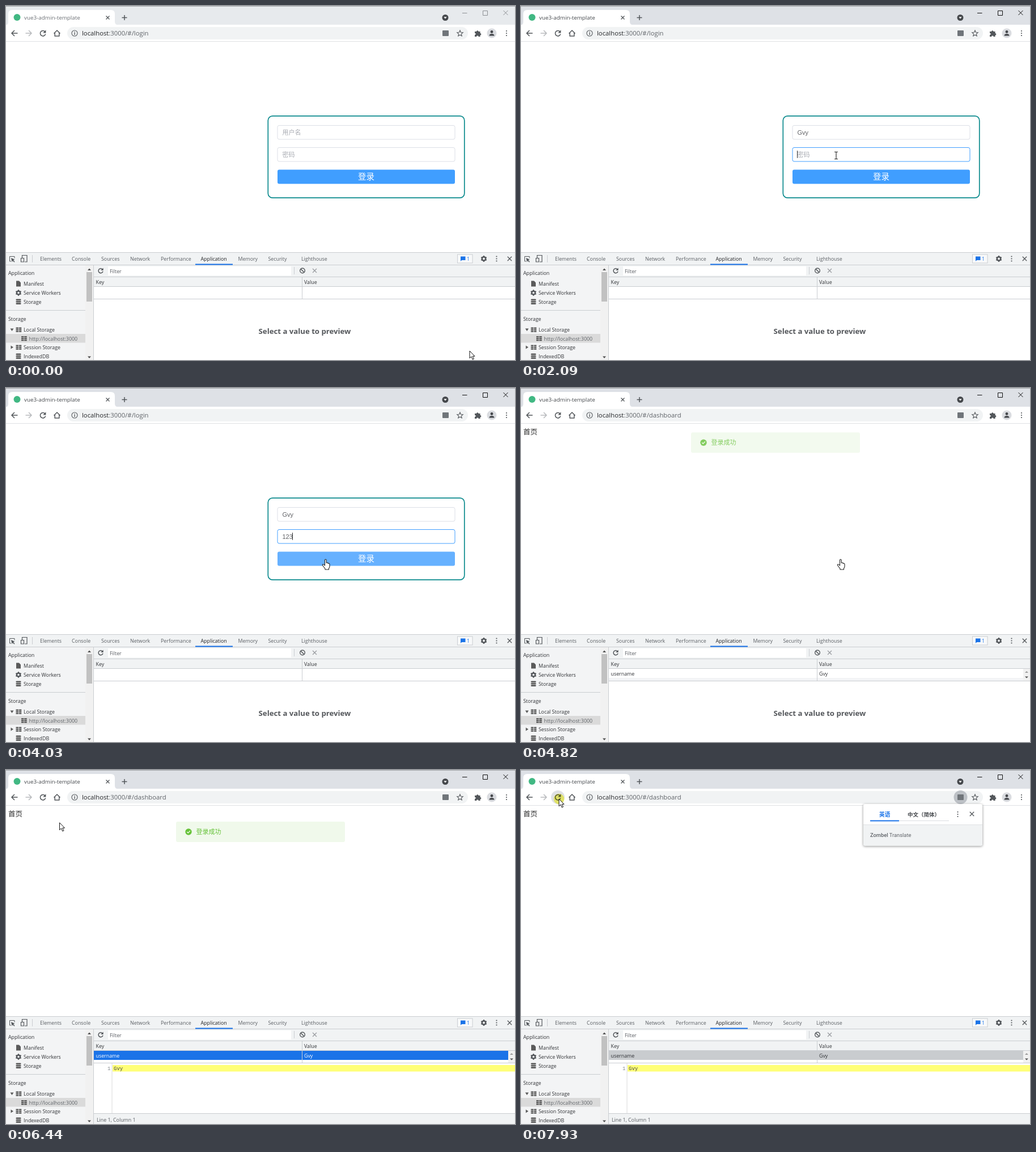
These frames come from a looping animation (898x624 px, 7.99 s). An HTML page:

```html
<!DOCTYPE html>
<html lang="zh-CN">
<head>
<meta charset="utf-8">
<title>Login demo</title>
<style>
html, body { margin: 0; width: 100%; height: 100%; overflow: hidden; background: #fff; }
svg { display: block; width: 898px; height: 624px; font-family: "Open Sans", "Noto Sans CJK SC", "Noto Sans CJK", sans-serif; }
text { white-space: pre; }
.input { font-family: "Liberation Sans", "Noto Sans CJK SC", "Noto Sans CJK", sans-serif; }
.code { font-family: "Liberation Mono", monospace; }
.brand { font-family: Roboto, sans-serif; }
.line { fill: none; stroke: #53575b; stroke-width: 1.5; }
</style>
</head>
<body>
<svg id="stage" viewBox="0 0 898 624"></svg>
<script>
const LOOP = 7990;
const USER = 'Gvy';
const DARK = '#53575b', INK = '#303236', BAR = '#f1f3f4', RULE = '#cacdd1', BLUE = '#1a73e8';

const rect = (x, y, w, h, fill, extra = '') =>
  `<rect x="${x}" y="${y}" width="${w}" height="${h}" fill="${fill}" ${extra}/>`;
const circle = (x, y, r, fill, extra = '') =>
  `<circle cx="${x}" cy="${y}" r="${r}" fill="${fill}" ${extra}/>`;
const path = (d, extra = 'class="line"') => `<path d="${d}" ${extra}/>`;
const solid = (d, fill = DARK) => path(d, `fill="${fill}"`);
const text = (x, y, s, size = 8.85, fill = INK, extra = '') =>
  `<text x="${x}" y="${y}" font-size="${size}" fill="${fill}" ${extra}>${s}</text>`;
const group = (id, body, extra = '') => `<g id="${id}" ${extra}>${body}</g>`;
const cross = (x, y, r, color = DARK, w = 1.3) =>
  path(`M${x - r} ${y - r}l${2 * r} ${2 * r}m0 ${-2 * r}l${-2 * r} ${2 * r}`,
    `fill="none" stroke="${color}" stroke-width="${w}"`);
const dots = (x, y) => [-4, 0, 4].map(d => circle(x, y + d, 1.1, DARK)).join('');
const reload = (x, y, r) =>
  path(`M${x + r * .8} ${y - r * .6}A${r} ${r} 0 1 0 ${x + r} ${y + r * .3}`) +
  solid(`M${x + r * 1.15} ${y - r * 1.2}v${r * 1.1}h${-r * 1.1}z`);
const gear = (x, y, r) =>
  circle(x, y, r * .62, 'none', `stroke="${DARK}" stroke-width="${r * .5}"`) +
  [0, 60, 120].map(a => [-1, 1].map(s =>
    rect(x - 1, y + s * r * .85 - 1, 2, 2, DARK, `transform="rotate(${a} ${x} ${y})"`)).join('')).join('');
const database = (x, y) => [0, 1, 2].map(i =>
  rect(x, y + i * 3.4, 9, 2.7, '#5a5a5a', 'rx="1.3"')).join('');
const table = (x, y) => [0, 1, 2].map(i =>
  rect(x, y + i * 3, 4.5, 2.3, '#5a5a5a') + rect(x + 5.3, y + i * 3, 4.5, 2.3, '#5a5a5a')).join('');
const star = (x, y, r) => path('M' + Array.from({ length: 10 }, (_, i) => {
  const a = Math.PI * (i / 5 - .5), k = i % 2 ? r * .45 : r;
  return `${x + k * Math.cos(a)} ${y + k * Math.sin(a)}`;
}).join('L') + 'Z', `fill="none" stroke="${DARK}" stroke-width="1.1"`);

function browser() {
  return rect(0, 0, 898, 33, '#e7eaed', 'id="titlebar"') + rect(0, 0, 898, 1, '#a3a6aa') +
    solid('M0 33.500Q4 33 4 28V14Q4 7 11 7H185Q192 7 192 14V28Q192 33 198 33.500Z', '#fff') +
    circle(19.5, 20, 6, '#41b883', 'id="favicon"') +
    text(32, 23.7, 'vue3-admin-template', 9.85, '#5f6368', 'id="tabTitle"') +
    cross(179.500, 20.500, 3, DARK) +
    path('M204.500 20.500h9m-4.500-4.500v9') +
    circle(775, 20.500, 5.5, '#45484c') + solid('M772.300 19.200h5.400l-2.700 3.200z', '#fff') +
    group('winButtons', path('M805 12.500h8.500M841.500 8.500h8v8h-8zM877.500 8l8 8m0-8l-8 8', ''),
      'fill="none" stroke="#8d9094" stroke-width="1"') +
    rect(0, 33, 898, 29, '#fff') + rect(0, 62, 898, 1, '#dfe1e4') +
    rect(108, 37, 707, 22, BAR, 'rx="11"') +
    path('M20.500 48H10m5-5l-5 5l5 5') +
    path('M34.500 48H45m-5-5l5 5l-5 5', 'fill="none" stroke="#b9bbbe" stroke-width="1.5"') +
    circle(65, 48, 12, '#dfe1e4', 'id="hover"') + reload(65, 48, 4.7) +
    path('M84.500 48.500L90 43l5.500 5.500M86.200 47.500V53h7.600v-5.500') +
    circle(121, 48, 5, 'none', `stroke="${DARK}" stroke-width="1.1"`) +
    rect(120.400, 47, 1.3, 4, DARK) + rect(120.400, 45, 1.3, 1.3, DARK) +
    `<text y="52" x="134" font-size="11.3" fill="#5f6368"><tspan fill="#25272a">localhost</tspan>:3000/#/<tspan id="route"></tspan></text>` +
    circle(775.500, 48, 12, '#bdc1c6', 'id="transBg"') + rect(770, 43, 11, 10, '#70757a', 'id="transIcon" rx="1"') +
    star(801, 48.500, 5.5) +
    solid('M827 45h3a1.800 1.800 0 1 1 3.600 0h3v3a1.800 1.800 0 1 1 0 3.600v2.400h-3a1.700 1.700 0 0 0-3.400 0H827v-3a1.700 1.700 0 0 0 0-3.400z') +
    circle(857, 48, 8.5, '#dadce0') + circle(857, 45.500, 2.4, '#45484c') +
    solid('M852.500 52.500q0-3.500 4.500-3.500t4.500 3.500z', '#45484c') + dots(883, 48);
}

const field = (id, y, hint) =>
  rect(479, y + .5, 313, 24.5, '#fff', `id="${id}Box" rx="3" stroke="#dcdfe6"`) +
  text(487.500, y + 17, hint, 11, '#a8abb2', `id="${id}" class="input"`) +
  rect(487, y + 6, 1, 13, '#303133', `id="${id}Caret"`);

function page() {
  const login = rect(462.300, 193.800, 346.500, 144.400, '#fff', 'rx="8" stroke="#0b8a8d" stroke-width="1.7"') +
    field('name', 210, '用户名') + field('pass', 249, '密码') +
    rect(479, 288.500, 313, 25, '#409eff', 'id="button" rx="3"') +
    text(635.500, 306.300, '登录', 14.5, '#fff', 'text-anchor="middle"');
  const toast = rect(300, 0, 298, 36, '#f0f9eb', 'rx="3"') + circle(322, 18, 5.7, '#67c23a') +
    path('M319.300 18l2 2l3.600-3.800', 'fill="none" stroke="#fff" stroke-width="1.2"') +
    text(335.500, 22, '登录成功', 11, '#67c23a');
  return rect(0, 63, 898, 371, '#fff') + group('login', login) +
    group('home', text(4, 82, '首页', 12.5, '#2c2c2c')) +
    `<g clip-path="url(#view)">${group('toast', toast)}</g>`;
}

function popup() {
  return group('popup', rect(604, 60, 210, 73.500, '#fff', 'rx="3" style="filter:drop-shadow(0 1px 2px #0007)"') +
    solid('M604 97H814V130.500Q814 133.500 811 133.500H607Q604 133.500 604 130.500Z', BAR) +
    rect(604, 96, 210, 1, '#e0e2e4') +
    text(632, 81.500, '英语', 9.7, BLUE, 'font-weight="700"') +
    text(682, 81.500, '中文（简体）', 9.5, '#45484c', 'font-weight="700"') +
    rect(616, 89, 139, 1, '#dadce0') + rect(616, 88.500, 51, 2, BLUE) +
    dots(770.500, 78) + cross(795.500, 77.500, 3.7) +
    text(616, 118.200, '<tspan font-weight="500">Zombel</tspan> Translate', 9.35, '#5f6368', 'class="brand"'));
}

function devtools() {
  const tabs = [[60, 'Elements'], [116, 'Console'], [168, 'Sources'], [219, 'Network'], [273, 'Performance'],
    [343.500, 'Application'], [409.500, 'Memory'], [462.500, 'Security'], [521, 'Lighthouse']];
  const bar = rect(0, 434, 898, 190, '#fff') + rect(0, 434, 898, 22, BAR) +
    rect(0, 434, 898, 1, RULE) + rect(0, 456, 898, 1, RULE) +
    tabs.map(([x, s]) => text(x, 449.300, s, 8.85, s === 'Application' ? '#202124' : '#5a5e63')).join('') +
    rect(334, 454.500, 66, 2, BLUE) +
    path('M9 450H6.500v-8.500h8.500v3', `fill="none" stroke="${DARK}"`) +
    solid('M9 444l6.500 3l-2.500 1l2.500 2.700l-1 1l-2.700-2.700l-1.200 2.500z') +
    path('M28.500 444v-4.500h8.500v11.500h-4M26.500 444.500h5v6.500h-5z', `fill="none" stroke="${DARK}" stroke-width="1.2"`) +
    rect(46, 439, 1, 13, RULE) +
    rect(796.500, 438, 26.500, 15, '#f8f9fa', `stroke="${RULE}"`) +
    solid('M802 441.500h8.500v6.500h-6.500l-2 2z', BLUE) + text(813, 449, '1', 8.85, BLUE) +
    gear(843, 445.500, 5.2) + dots(865.500, 445.500) + cross(888.500, 445.500, 3.7);

  const side = rect(0, 457, 140, 167, '#f3f4f5') + rect(140, 457, 14, 167, '#f1f1f1') +
    rect(142, 469, 10, 52, '#c1c1c1') + solid('M144 466h6l-3-3.500zM144 617.500h6l-3 3.500z', '#505050') +
    rect(0, 536, 140, 1, RULE) + rect(0, 578, 140, 15.500, '#dadada') +
    text(4, 474.200, 'Application') + text(4, 555.200, 'Storage') +
    solid('M18 484.500h5l3 3v7h-8z', '#5a5a5a') + gear(22, 505.500, 5) + database(17.500, 516.500) +
    [['Manifest', 492.700], ['Service Workers', 508.700], ['Storage', 524.500], ['Local Storage', 574],
      ['Session Storage', 605.300], ['IndexedDB', 620.800]].map(([s, y]) => text(31, y, s)).join('') +
    text(40.500, 589.700, 'http://localhost:3000', 8.85, '#5f6368') +
    table(17.500, 566.500) + table(27, 582) + table(17.500, 597.500) + database(17.500, 612.500) +
    solid('M7.500 568.500h6l-3 4.500zM8.500 598.500v6l4.500-3z', '#5a5a5a') + rect(154, 457, 1, 167, RULE);

  const grid = rect(155, 457, 743, 37, BAR) + rect(180, 459, 323, 16, '#fff') +
    reload(167, 466.500, 4) + text(183, 470.500, 'Filter', 8.85, '#5a5e63') + rect(508, 460, 1, 13, RULE) +
    circle(523, 466.500, 4.3, 'none', `stroke="${DARK}" stroke-width="1.4"`) +
    path('M520 463.500l6 6') + cross(544.500, 466.500, 3.5, '#9a9da1') +
    rect(155, 477, 743, 1, RULE) + rect(155, 494, 743, 1, RULE) +
    group('row', rect(155, 511, 731, 5, '#f3f4f6', 'id="stripe"') + rect(155, 495, 731, 16, '#fff', 'id="rowBg"') +
      group('rowText', text(158.500, 506.500, 'username', 8.85, '') + text(526, 506.500, USER, 8.85, '')) +
      rect(886, 495, 12, 21, '#f1f1f1') + solid('M889 502h6l-3-3z', '#9a9a9a') + solid('M889 508.500h6l-3 3z', '#505050')) +
    rect(522, 478, 1, 38, RULE) + rect(155, 516, 743, 1, RULE) +
    text(158.500, 490.200, 'Key') + text(526, 490.200, 'Value');

  const preview = text(527, 577.700, 'Select a value to preview', 13.2, '#54575b',
    'id="empty" font-weight="700" text-anchor="middle"') +
    group('editor', rect(155, 517, 743, 88, '#fff') + rect(186.500, 517, 1, 88, '#dcdcdc') +
      rect(188, 520, 710, 11.5, '#ffff78') + text(179, 529, '1', 9, '#80868b', 'class="code"') +
      text(190, 529, USER, 9, '#444', 'class="code"') + rect(155, 605, 743, 19, BAR) +
      rect(155, 605, 743, 1, RULE) + text(160, 620, 'Line 1, Column 1', 8.85, '#5a5e63'));
  return bar + side + grid + preview;
}

const pointers =
  group('arrow', path('M0 0V12.800L3 10L5.200 15L7.400 14L5.200 9.300H9Z', 'fill="#fff" stroke="#111" stroke-width="1"')) +
  group('beam', path('M-3 -6.200H-.7L0 -5.500L.7 -6.200H3M0 -5.500V5.500M-3 6.200H-.7L0 5.500L.7 6.200H3',
    'fill="none" stroke="#222" stroke-width="1.1"')) +
  group('hand', path('M-1.500 2V-7.500Q-1.500 -9 -.2 -9T1.200 -7.500V-2.800Q2.400 -3.800 3.400 -2.300Q4.600 -3 5.200 -1.500Q7 -2 7 0V3.500Q7 5 5.500 7V9H-1V7.500L-5.500 1.500Q-6 0 -4.500 -.3Q-3 -.3 -1.500 2Z',
    'fill="#fff" stroke="#222" stroke-width="1.1" stroke-linejoin="round"'));

const stage = document.getElementById('stage');
stage.innerHTML = '<clipPath id="view"><rect y="63" width="898" height="371"/></clipPath>' +
  browser() + page() + popup() + devtools() + circle(0, 0, 9.3, '#ffff50', 'id="click" opacity=".8" style="mix-blend-mode:multiply"') + pointers;
const el = {};
stage.querySelectorAll('[id]').forEach(e => el[e.id] = e);
const set = (id, name, value) => el[id].setAttribute(name, value);
const show = (id, on) => set(id, 'display', on ? 'inline' : 'none');

// Screen refreshes: first time, last time, count
const bursts = [[0, 0, 1], [70, 210, 3], [360, 360, 1], [600, 770, 3], [1160, 1160, 1], [1310, 1310, 1],
  [1480, 2090, 9], [2470, 2470, 1], [2760, 2760, 1], [3230, 3230, 1], [3570, 3570, 1], [3720, 4030, 5],
  [4590, 5330, 11], [5420, 5500, 2], [5720, 6500, 11], [6590, 7380, 11], [7930, 7930, 1]];
function refreshTime(t) {
  const [a, b, n] = bursts.filter(s => s[0] <= t).pop();
  if (n === 1) return a;
  const d = (b - a) / (n - 1);
  return a + d * Math.min(n - 1, Math.floor((t - a) / d + .1));
}

// Pointer path: time, x, y
const track = [[0, 818, 608], [210, 557, 230], [1400, 557, 230], [1480, 561, 256], [1860, 556, 263.500],
  [3650, 556, 263.500], [3960, 564, 311], [4880, 564, 311], [5330, 505, 486], [5500, 498, 508],
  [5660, 498, 508], [5860, 492, 507], [6030, 492, 507], [6500, 63, 60], [6590, 62, 47],
  [7080, 62, 47], [7300, 67, 51], [LOOP, 67, 51]];
function pointerAt(t) {
  const i = track.findIndex(k => k[0] > t);
  const [a, x, y] = track[i - 1], [b, u, v] = track[i];
  const s = (t - a) / (b - a), k = s * s * (3 - 2 * s);
  return [x + (u - x) * k, y + (v - y) * k];
}

// CSS "ease" curve
function ease(x) {
  if (x <= 0) return 0;
  if (x >= 1) return 1;
  let lo = 0, hi = 1;
  for (let i = 0; i < 20; i++) {
    const m = (lo + hi) / 2;
    if (.75 * m * (1 - m) + m ** 3 < x) lo = m; else hi = m;
  }
  return .3 * lo * (1 - lo) ** 2 + 3 * lo * lo * (1 - lo) + lo ** 3;
}

function fill(id, value, hint, focus, caret) {
  set(id + 'Box', 'stroke', focus ? '#409eff' : '#dcdfe6');
  el[id].textContent = value || hint;
  set(id, 'fill', value ? '#606266' : '#a8abb2');
  show(id + 'Caret', focus && caret);
  set(id + 'Caret', 'x', value ? Math.floor(487.500 + el[id].getComputedTextLength()) : 487);
}
const typed = (word, times, t) => word.slice(0, times.filter(k => t >= k).length);
const within = (t, a, b) => t >= a && t < b;

function render(time) {
  const t = refreshTime(time);
  const active = t >= 600, done = t >= 4662, picked = t >= 5950;

  set('titlebar', 'fill', active ? '#dee1e6' : '#e7eaed');
  set('tabTitle', 'fill', active ? '#45494d' : '#6b6f74');
  set('winButtons', 'stroke', active ? '#111' : '#8d9094');
  el.route.textContent = done ? 'dashboard' : 'login';
  set('favicon', 'r', within(t, 6740, 7140) ? 3 : 6);
  show('transIcon', !within(t, 6900, 7210));
  show('transBg', t >= 7290);
  show('hover', t >= 6580);
  show('popup', t >= 7290);

  show('login', !done);
  const passFocus = t >= 1930;
  fill('name', typed(USER, [1310, 1550, 1700], t), '用户名', t >= 360 && !passFocus, !within(t, 1160, 1310));
  fill('pass', typed('123', [2760, 3230, 3570], t), '密码', passFocus, !within(t, 2470, 2760));
  set('button', 'fill', t >= 3860 ? '#66b1ff' : '#409eff');

  show('home', done);
  show('toast', done && t < 7140);
  set('toast', 'transform', `translate(0 ${55 + 36 * ease((t - 4662) / 400)})`);
  set('toast', 'opacity', ease((t - 4662) / 300));

  const live = picked && t < 6740;
  show('row', done);
  set('rowBg', 'fill', live ? BLUE : picked ? '#c9cccf' : '#fff');
  set('stripe', 'fill', picked ? '#fff' : '#f3f4f6');
  set('rowText', 'fill', live ? '#fff' : INK);
  el.rowText.querySelectorAll('text').forEach(e => e.removeAttribute('fill'));
  show('empty', !picked);
  show('editor', picked);

  const [x, y] = pointerAt(t);
  const shape = within(t, 200, 3850) ? 'beam' : within(t, 3850, 4900) ? 'hand' : 'arrow';
  for (const id of ['arrow', 'beam', 'hand']) {
    show(id, id === shape);
    set(id, 'transform', `translate(${x} ${y})`);
  }
  show('click', [[600, 760], [1930, 2080], [4590, 4730], [5870, 6030], [6660, 6820], [7930, LOOP]]
    .some(([a, b]) => within(t, a, b)));
  set('click', 'cx', x);
  set('click', 'cy', shape === 'hand' ? y - 8 : y);
}

let start;
function tick(now) {
  start ??= now;
  render((now - start) % LOOP);
  requestAnimationFrame(tick);
}
render(0);
requestAnimationFrame(tick);
</script>
</body>
</html>
```
